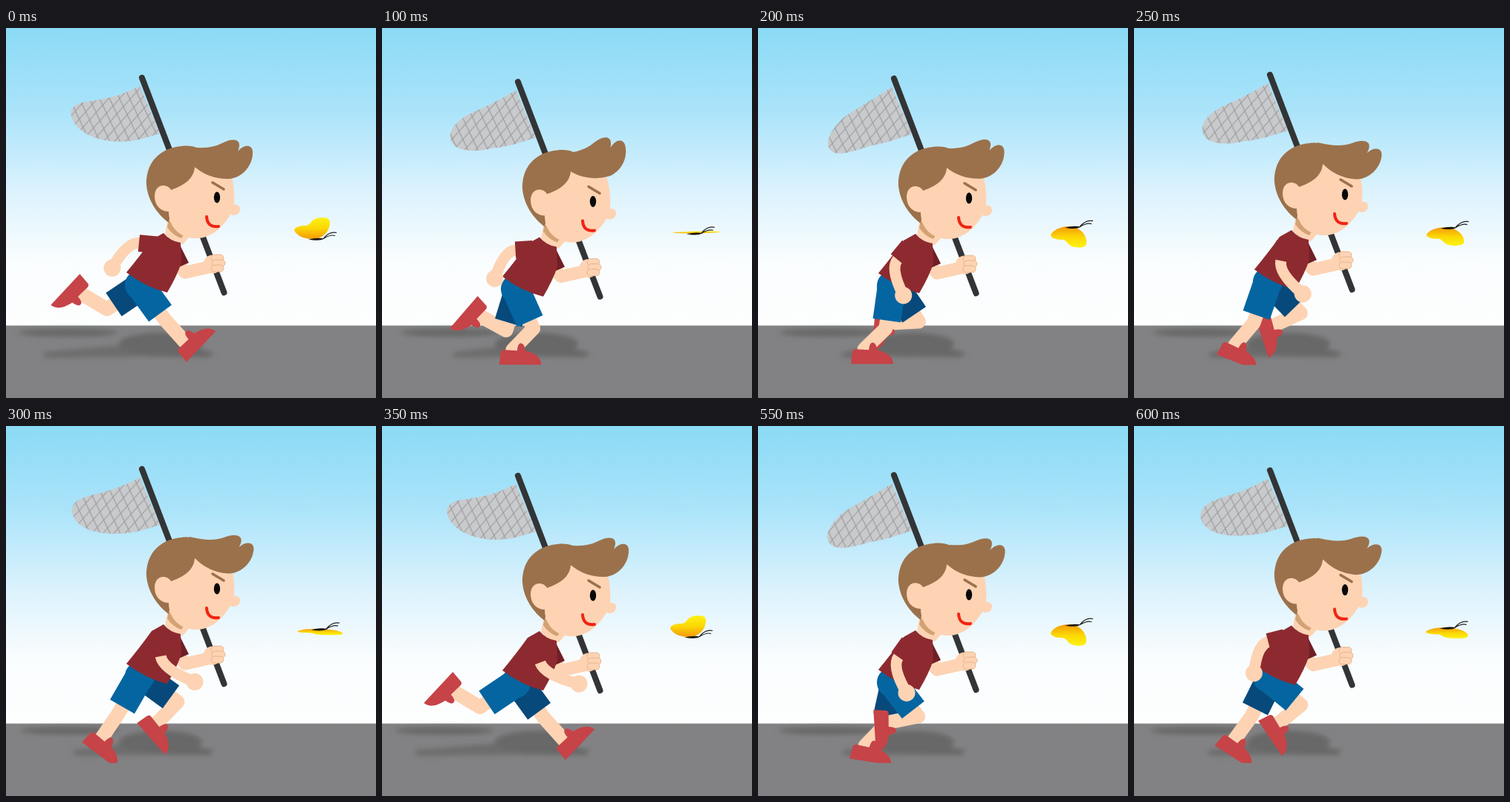
Recreate the animation shown at these times as an HTML page. Size 498 by 498 pixels, loop 650 ms.

```html
<!DOCTYPE html>
<html lang="en">
<head>
<meta charset="utf-8">
<title>Boy chasing a butterfly</title>
<style>
html, body { margin: 0; width: 100%; height: 100%; overflow: hidden; background: #fff; }
svg { display: block; width: 100vw; height: 100vh; }
.skin { fill: #fdd3b3; }
.limb { fill: none; stroke: #fdd3b3; stroke-linecap: round; stroke-linejoin: round; }
.hair { fill: #9b714b; }
.shirt { fill: #8d2a30; }
</style>
</head>
<body>
<svg viewBox="0 0 498 498">
  <defs>
    <linearGradient id="sky" x2="0" y2="1">
      <stop offset="0" stop-color="#8bdaf5"/>
      <stop offset=".28" stop-color="#abe4fa"/>
      <stop offset=".56" stop-color="#def3fd"/>
      <stop offset=".78" stop-color="#fafdfe"/>
      <stop offset="1" stop-color="#fdfefe"/>
    </linearGradient>
    <linearGradient id="wingFill" gradientUnits="userSpaceOnUse" x1="0" y1="0" x2="0">
      <stop offset="0" stop-color="#f59b0a"/>
      <stop offset=".55" stop-color="#fcd804"/>
      <stop offset="1" stop-color="#fdee10"/>
    </linearGradient>
    <pattern id="mesh" width="14" height="21" patternUnits="userSpaceOnUse" patternTransform="rotate(4) skewX(-6)">
      <rect width="14" height="21" fill="#c9cacc"/>
      <path d="M0 0L14 21M14 0L0 21" stroke="#97989b"/>
    </pattern>
    <filter id="blur" x="-20%" y="-60%" width="140%" height="220%"><feGaussianBlur stdDeviation="3"/></filter>
    <clipPath id="aboveGround"><rect width="498" height="453.500"/></clipPath>
    <path id="shoe" fill="#c64347" d="M-18 20L-16 3Q-15 0-12 0L6 1Q7-9 11-9Q16-9 17 1Q38 6 39 20Z"/>
  </defs>

  <rect width="498" height="402" fill="url(#sky)"/>
  <rect y="400.500" width="498" height="98" fill="#828284"/>

  <g filter="url(#blur)" fill="#686868">
    <ellipse id="longShadow" cy="410" rx="67" ry="5.500"/>
    <path id="legShadow" opacity=".8"/>
    <ellipse cx="208" cy="425" rx="56" ry="15"/>
    <path d="M200 418L280 437L274 443L190 442Z"/>
  </g>

  <g id="pole">
    <path id="net" fill="url(#mesh)"/>
    <path d="M183 67L293.500 356" stroke="#333436" stroke-width="8" stroke-linecap="round"/>
    <path class="limb" d="M233 320L241 329L272 322" stroke-width="17"/>
    <g class="skin" stroke="#dfae84" stroke-width=".8">
      <circle cx="278" cy="318" r="12.500" stroke="none"/>
      <rect x="276" y="305" width="17" height="9" rx="4.500"/>
      <rect x="277" y="312" width="18" height="9" rx="4.500"/>
      <rect x="276" y="319" width="17" height="9" rx="4.500"/>
    </g>
  </g>

  <g clip-path="url(#aboveGround)">
    <g id="farLeg"></g>
    <g id="nearLeg"></g>
  </g>

  <g id="body">
    <path d="M232 288L246 316L230 323Z" fill="#701f26"/>
    <path class="skin" d="M219 252L252 275L238 291Q222 289 214 277Z"/>
    <path class="shirt" d="M212 276Q221 287 235 289L236 316Q230 334 217 356Q188 349 162 329Q181 306 196 285Z"/>
    <path d="M219 259L240 277L236 283Q224 279 217 268Z" fill="#d3a274"/>
    <path class="hair" d="M189 211C188 184 204 162 236 159C250 157 262 161 272 172L268 196L226 225L219 262C203 250 191 232 189 211Z"/>
    <path class="skin" d="M254 188Q252 208 222 218C218 210 201 208 200 226C200 240 209 247 219 247C219 267 233 282 254 283C274 284 291 270 302 251C310 254 315 249 315 244C315 239 311 237 307 238C308 224 307 207 301 192Q280 185 258 182Z"/>
    <path id="tuft" class="hair" d="M244 160C270 163 281 160 293 154C306 148 315 150 314 159Q313 164 312 166C321 156 331 157 332 166C333 184 319 201 301 203Q274 204 254 187Z"/>
    <ellipse cx="284" cy="228" rx="4.200" ry="7.500" fill="#090909"/>
    <path d="M278 208L293 217" stroke="#9b714b" stroke-width="3.500" stroke-linecap="round"/>
    <path d="M270 254Q271 269 286 267" fill="none" stroke="#f02413" stroke-width="4" stroke-linecap="round"/>
    <g id="arm">
      <path class="limb" stroke-width="15"/>
      <circle class="skin" r="11.500"/>
      <path stroke="#8d2a30" stroke-width="23"/>
    </g>
  </g>

  <g id="butterfly">
    <path id="wings" fill="url(#wingFill)"/>
    <path d="M-10 1Q2-2 12 0Q4 4-10 1Z" fill="#18150d"/>
    <path d="M10 0Q18-10 28-8M10 0Q20-6 26-4" fill="none" stroke="#222" stroke-width="1.200"/>
  </g>
</svg>

<script>
const $ = id => document.getElementById(id);
const STEP = 50, FIRST = 7, SECOND = 6;
const THIGH = 58, SHIN = 40, SHORTS = 47;

// Four poses per stride: lunge, landing, support, push-off.
const BOB = [0, 5.5, 1, -9];
// Thigh and shin angles, forward of straight down: a leg in front, then behind.
const THIGH_SWING = [36, 24, -8, -30, -56, -17, 34, 54];
const SHIN_SWING = [42, -44, -46, -34, -121, -119, -87, -44];

const NET = [[180, 78], [150, 94], [128, 96], [110, 99], [94, 101], [85, 107], [88, 119],
  [93, 139], [120, 152], [150, 153], [170, 154], [188, 148], [207, 142]];
const WING = [[-31, -13], [-20, -18], [-10, -17], [-3, -27], [12, -29],
  [20, -25], [17, -10], [5, 0], [-10, 1], [-24, -4]];

const lerp = (a, b, k) => a + (b - a) * k;
const mix = (a, b, k) => a.map((v, i) => lerp(v, b[i], k));

function set(el, attrs) {
  for (const name in attrs) el.setAttribute(name, attrs[name]);
}

// Value at a phase counted in strides; poses are 2/7 of a stride apart, the last 1/7.
function follow(keys, phase) {
  const stride = Math.floor(phase), p = (phase - stride) * 7;
  const pose = Math.min(3, Math.floor(p / 2));
  const i = stride * 4 + pose;
  return lerp(keys[i], keys[(i + 1) % keys.length], (p - pose * 2) / (pose < 3 ? 2 : 1));
}

// Point at a distance and an angle forward of straight down.
function reach([x, y], length, degrees) {
  const a = degrees * Math.PI / 180;
  return [x + length * Math.sin(a), y + length * Math.cos(a)];
}

// Closed smooth outline through the midpoints of a polygon.
function smooth(points) {
  return `M${mix(points.at(-1), points[0], .5)}` + points.map((p, i) =>
    `Q${p} ${mix(p, points[(i + 1) % points.length], .5)}`).join('') + 'Z';
}

function makeLeg(id, color) {
  $(id).innerHTML = `<path class="limb" stroke-width="19"/><circle r="20" fill="${color}"/>
    <path stroke="${color}" stroke-width="38"/><use href="#shoe"/>`;
}

function drawLeg(id, hip, phase) {
  const [skin, seat, shorts, shoe] = $(id).children;
  const thigh = follow(THIGH_SWING, phase), shin = follow(SHIN_SWING, phase);
  const knee = reach(hip, THIGH, thigh), ankle = reach(knee, SHIN, shin);
  const planted = Math.max(0, Math.min(1, 1.5 - 3.5 * Math.abs(phase - .43)));
  set(skin, { d: `M${mix(hip, knee, .7)}L${knee}L${ankle}` });
  set(seat, { cx: hip[0], cy: hip[1] });
  set(shorts, { d: `M${hip}L${reach(hip, SHORTS, thigh)}` });
  set(shoe, { transform: `translate(${ankle}) rotate(${-1.1 * shin * (1 - planted)})` });
  return ankle;
}

function drawArm(swing) {
  const [skin, palm, sleeve] = $('arm').children;
  const shoulder = [203, 292];
  const hand = [204 - 61 * swing, 361 - 12 * swing - 26 * swing ** 2];
  const dx = hand[0] - shoulder[0], dy = hand[1] - shoulder[1];
  const bend = 22 / Math.hypot(dx, dy);
  const [mx, my] = mix(shoulder, hand, .5);
  const elbow = [mx - dy * bend, my + dx * bend];
  const cuff = mix(shoulder, elbow, .6);
  set(skin, { d: `M${cuff}Q${elbow} ${hand}` });
  set(palm, { cx: hand[0], cy: hand[1] });
  set(sleeve, { d: `M${shoulder}L${cuff}` });
}

// The bag droops more the farther it is from the pole.
function drawNet(sag) {
  const points = NET.map(([x, y]) => {
    const far = Math.max(0, (195 - x) / 108) ** 2.5;
    return [x + 7 * sag * far, y + 42 * sag * far];
  });
  set($('net'), { d: `M${points[0]}C${points.slice(1).join(' ')}Z` });
}

function drawButterfly(lift) {
  const spread = 2 - Math.abs(lift);
  const wing = WING.map(([x, y]) => [x > 0 ? x * spread : x, y * lift]);
  set($('butterfly'), { transform: `translate(${420 - 3 * lift} ${275.5 + 8 * lift})` });
  set($('wings'), { d: smooth(wing) });
  set($('wingFill'), { y2: -26 * lift || -1 });
}

function draw(step) {
  const second = step < FIRST ? 0 : 1;
  const s = second ? ((step - FIRST) / SECOND) ** 1.15 : step / FIRST;
  const bob = follow(BOB, s);
  const sag = Math.sin(Math.PI * s) ** 2;
  const shift = `translate(0 ${bob})`;

  set($('body'), { transform: shift });
  set($('pole'), { transform: shift });
  set($('tuft'), { transform: `rotate(${Math.min(7, -2.2 * bob)} 262 182)` });
  drawNet(sag);
  drawArm(Math.cos(Math.PI * (s ** 1.4 + second)));
  drawButterfly(Math.cos(2 * Math.PI * .82 * s));

  const far = drawLeg('farLeg', [184, 346 + bob], 1 - second + s);
  const near = drawLeg('nearLeg', [180, 346 + bob], second + s);
  const x = 1.5 * Math.min(far[0], near[0]) - 100;
  set($('longShadow'), { cx: 84 + 13 * sag });
  set($('legShadow'), { d: `M210 422L${x} 436Q${x - 8} 443 ${x + 8} 444L215 442Z` });
}

makeLeg('farLeg', '#07497a');
makeLeg('nearLeg', '#0465a1');

const start = performance.now();
function tick() {
  draw(Math.floor((performance.now() - start) / STEP) % (FIRST + SECOND));
  requestAnimationFrame(tick);
}
tick();
</script>
</body>
</html>
```
